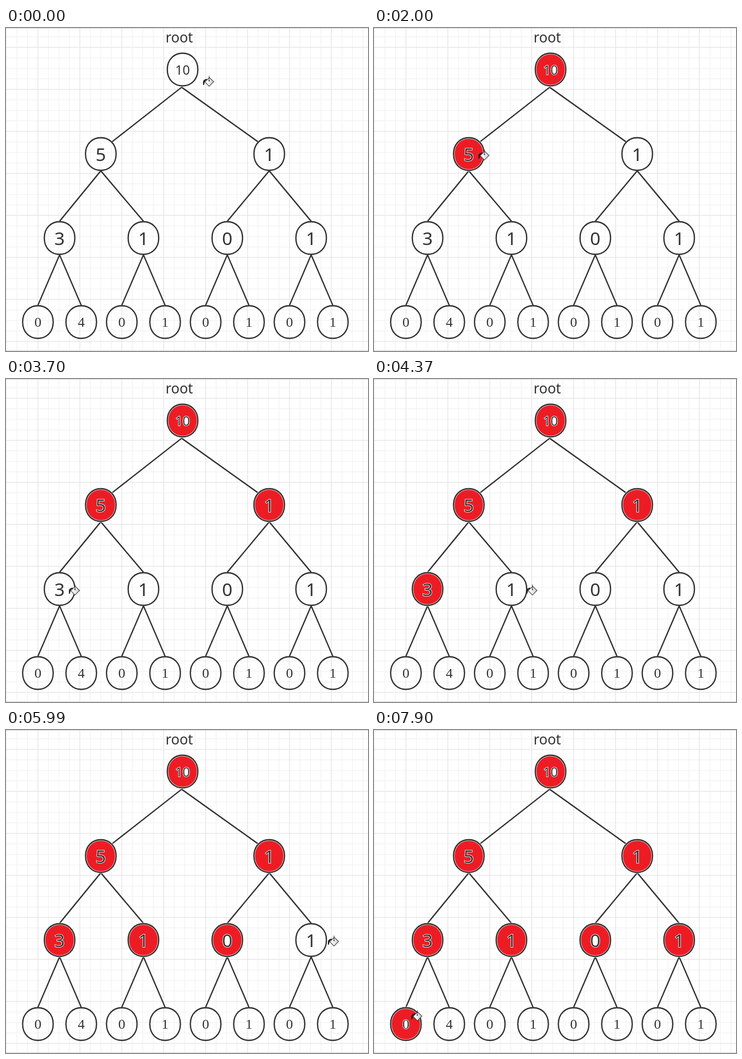
Write an HTML page that moves like this. It is 777 px wide and 692 px high and loops after 8 s.

```html
<!DOCTYPE html>
<html lang="en">
<head>
<meta charset="utf-8">
<title>Level-order tree walk</title>
<style>
  html, body { margin: 0; width: 100%; height: 100%; overflow: hidden; background: #fff; }
  svg { display: block; width: 777px; height: 692px; }
  text { fill: #333; text-anchor: middle; font-family: "Noto Sans", "Open Sans", sans-serif; }
  .leaf { font-family: "Liberation Serif", serif; }
  .edge, .ring { fill: none; stroke: #333; stroke-width: 2.8; }
  .paint { fill: #ed1c24; }
  .fringe { fill: none; stroke: #fff; stroke-opacity: 0.75; stroke-width: 4.8; }
  .paint, .fringe, .hole { visibility: hidden; }
  .filled .paint, .filled .fringe, .filled .hole { visibility: visible; }
  .filled text { stroke: #fff; stroke-width: 2; paint-order: stroke; }
</style>
</head>
<body>
<svg viewBox="0 0 777 692">
  <defs>
    <linearGradient id="metal">
      <stop offset="0.2" stop-color="#fff"/>
      <stop offset="1" stop-color="#c4c4c8"/>
    </linearGradient>
  </defs>
  <g id="grid"></g>
  <g id="edges"></g>
  <g id="nodes"></g>
  <text x="372" y="30.5" font-size="30">root</text>
  <circle id="ripple" r="17.5" fill="#ff0" fill-opacity="0.47"/>
  <!-- The origin is the tip of the pouring paint. -->
  <g id="bucket">
    <path d="M13.5-16 23-7 13 3 4-6.5Z" fill="url(#metal)" stroke="#333" stroke-width="1.1"/>
    <path d="M0 0V-7Q1-12 8-13L9-11Q4-10 3.5-6L2 0Z" fill="#1c1c2c"/>
    <path d="M13-19.5V-10" stroke="#333" stroke-width="1.2"/>
    <circle cx="13" cy="-9" r="1.3" fill="#333"/>
  </g>
</svg>
<script>
const LOOP = 8000;
const byId = id => document.getElementById(id);

function add(parent, tag, attrs, text = "") {
  const el = document.createElementNS("http://www.w3.org/2000/svg", tag);
  for (const name in attrs) el.setAttribute(name, attrs[name]);
  el.textContent = text;
  return parent.appendChild(el);
}

function gridLines(step, stroke) {
  for (let p = -90; p < 777; p += step) {
    const d = `M${p + 68.5} 0V692M0 ${p + 41.5}H777`;
    add(byId("grid"), "path", { d, stroke, "stroke-width": 1.5 });
  }
}
gridLines(22.5, "#f2f2f2");
gridLines(90, "#e5e5e5");
add(byId("grid"), "path", { d: "M0 .5H777M0 691.5H777", stroke: "#c8c8c8" });

// Each level: first centre, distance between centres, digit size.
const levels = [
  { x: 379, y: 89, gap: 0, size: 27.5 },
  { x: 203.5, y: 270, gap: 361.5, size: 39 },
  { x: 115, y: 450, gap: 180, size: 39 },
  { x: 68.5, y: 630, gap: 90, size: 30 }
];

// Nodes in level order; children of i are 2i+1 and 2i+2.
function place(i) {
  const level = Math.floor(Math.log2(i + 1));
  const { x, y, gap, size } = levels[level];
  const k = i + 1 - 2 ** level;
  const isLeaf = level === 3;
  const spread = isLeaf ? 3 * (k % 2) : 0;
  return { x: x + gap * k + spread, y, size, level, isLeaf };
}

function oval(x, y) {
  const w = 32.8, h = 35, c = h * 4 / 3;
  return `M${x - w} ${y}C${x - w} ${y - c} ${x + w} ${y - c} ${x + w} ${y}` +
    `C${x + w} ${y + c} ${x - w} ${y + c} ${x - w} ${y}Z`;
}

function drawEdge(i) {
  const child = place(i), parent = place((i - 1) >> 1);
  let from = [parent.x, parent.y + 36], to = [child.x, child.y - 36];
  if (child.level === 1) {
    // The wide branches meet the children at the shoulder.
    from = [parent.x - 2, parent.y + 38];
    to = [child.x + Math.sign(parent.x - child.x) * 24.5, child.y - 26.5];
  }
  add(byId("edges"), "path", { d: `M${from}L${to}`, class: "edge" });
}

function drawNode(value, i) {
  const { x, y, size, isLeaf } = place(i);
  const g = add(byId("nodes"), "g", {});
  const baseline = y + size * (isLeaf ? 0.34 : 0.385);
  for (const name of ["paint", "fringe", "ring"]) {
    add(g, "path", { d: oval(x, y), class: name });
  }
  // The inside of a zero stays white when the node is filled.
  if (value.endsWith("0")) {
    add(g, "ellipse", {
      class: "hole", fill: "#fff",
      cx: x + (value.length - 1) * size * 0.286, cy: baseline - size * 0.35,
      rx: size * 0.17, ry: size * 0.3
    });
  }
  add(g, "text", { x, y: baseline, "font-size": size, class: isLeaf ? "leaf" : "" }, value);
  if (i) drawEdge(i);
  return g;
}
const nodes = "10 5 1 3 1 0 1 0 4 0 1 0 1 0 1".split(" ").map(drawNode);

// The bucket leaves for each node in turn, arrives a little early and clicks.
const REST = 60, HIGHLIGHT = 130;
const visits = [
  { leave: 590, click: 980 }, { leave: 1300, click: 1860 },
  { leave: 2140, click: 2870 }, { leave: 3080, click: 3760 },
  { leave: 3970, click: 4570 }, { leave: 4770, click: 5390 },
  { leave: 5590, click: 6260 }, { leave: 6470, click: 7560 }
];
const stops = visits.map(({ leave, click }, i) => {
  const { x, y } = place(i);
  return { leave, arrive: click - REST, x: x + 20, y: y + 10 };
});
stops.push({ leave: 7720, arrive: 7900, x: 80, y: 620 });

// Fast start, slight overshoot, then back.
function easeOutBack(p) {
  const u = p - 1;
  return 1 + 2.7 * u ** 3 + 1.7 * u ** 2;
}

function bucketAt(t) {
  let x = 423, y = 122;
  for (const stop of stops) {
    if (t < stop.leave) break;
    const p = easeOutBack(Math.min(1, (t - stop.leave) / (stop.arrive - stop.leave)));
    x += (stop.x - x) * p;
    y += (stop.y - y) * p;
  }
  return [Math.round(x), Math.round(y)];
}

function draw(t) {
  const position = `translate(${bucketAt(t)})`;
  const clicking = visits.some(({ click }) => t >= click && t < click + HIGHLIGHT);
  byId("bucket").setAttribute("transform", position);
  byId("ripple").setAttribute("transform", position);
  byId("ripple").setAttribute("visibility", clicking ? "visible" : "hidden");
  visits.forEach(({ click }, i) => nodes[i].classList.toggle("filled", t >= click));
}

const origin = performance.now();
function tick() {
  draw((performance.now() - origin) % LOOP);
  requestAnimationFrame(tick);
}
tick();
</script>
</body>
</html>
```
